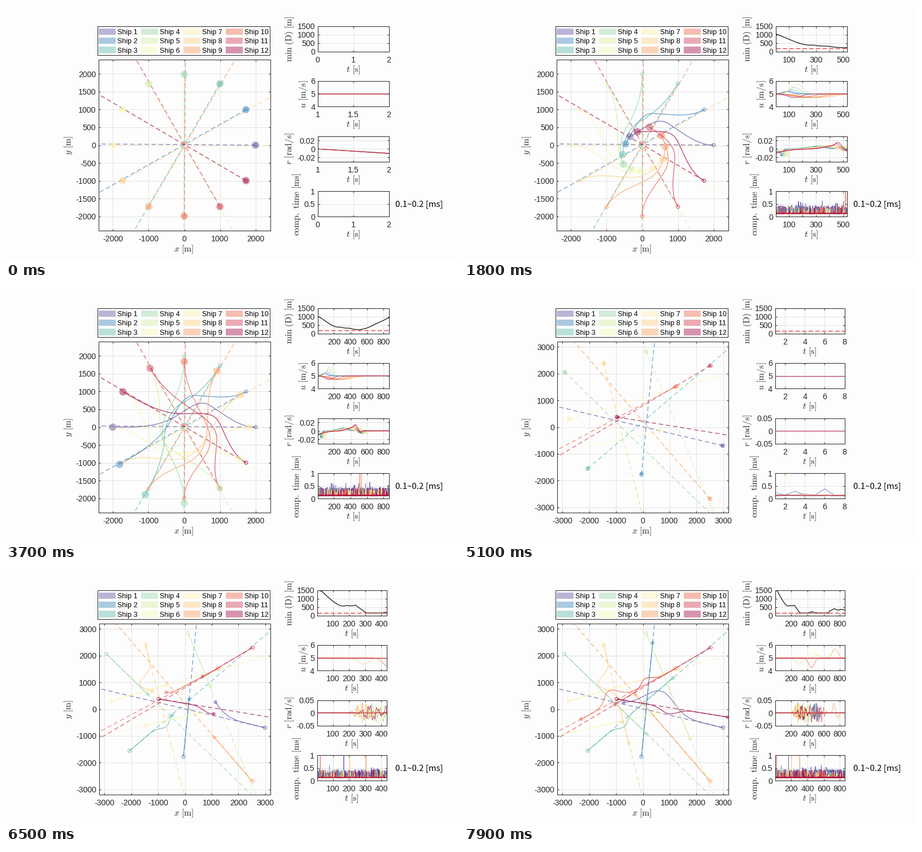
A matplotlib script for the animation above (8 s loop, 800 by 450 pixels).

```python
import numpy as np
import matplotlib.pyplot as plt
from matplotlib.animation import FuncAnimation

W, H, DPI = 800, 450, 100
PX = 72 / DPI
INK, PAPER = "#262626", "#fdfdfe"
COLORS = plt.get_cmap("Spectral_r")(np.linspace(0, 1, 12))
SHIPS = np.arange(12)
PANEL_H = 45.3
SPEED = 5
TIME = np.arange(1, 869)

plt.rcParams.update({
    "font.family": "Liberation Sans", "mathtext.fontset": "cm",
    "axes.unicode_minus": False, "axes.edgecolor": INK,
    "axes.linewidth": PX, "axes.axisbelow": True,
})

fig = plt.figure(figsize=(W / DPI, H / DPI), dpi=DPI, facecolor=PAPER)
stage = fig.add_axes([0, 0, 1, 1], zorder=-1)
stage.set(xlim=(0, W), ylim=(H, 0))
stage.axis("off")


def turn_by(degrees):
    return np.exp(1j * np.radians(degrees))


def bump(center, width, x=TIME):
    return np.exp(-((x - center) / width) ** 2)


def hermite(t, knots, pts, vel):
    knots, pts, vel = map(np.asarray, (knots, pts, vel))
    i = np.clip(np.searchsorted(knots, t, "right") - 1, 0, len(knots) - 2)
    h = knots[i + 1] - knots[i]
    s = np.clip((t - knots[i]) / h, 0, 1)
    return ((1 + 2 * s) * (1 - s) ** 2 * pts[i] + s * (1 - s) ** 2 * h * vel[i]
            + s * s * (3 - 2 * s) * pts[i + 1] + s * s * (s - 1) * h * vel[i + 1])


def nearest_gap(paths, floor):
    """Smallest distance between any two ships at each moment."""
    a, b = np.triu_indices(12, 1)
    return np.maximum(abs(paths[a] - paths[b]).min(axis=0), floor)


def solve_times(seed, peaks):
    rng = np.random.default_rng(seed)
    shape = (12, len(TIME))
    rows = .11 + .035 * rng.random(shape)
    rows += (rng.random(shape) < .03) * .3 * rng.random(shape)
    busy = TIME % 3 == 0
    rows[0, busy] = .28 + .17 * rng.random(busy.sum())
    rows[0] += (rng.random(len(TIME)) < .04) * .2
    for ship, t in peaks:
        rows[ship, t - 1] = 1
    return rows


# ---- circle crossing -------------------------------------------------------
def circle_paths():
    """Each ship veers to starboard, rounds the centre and leaves opposite."""
    r1 = np.interp(SHIPS, [1, 2, 4, 5], [940, 690, 735, 975])
    a1 = np.interp(SHIPS, [1, 2, 3, 4], [41, 33, 33, 39])
    r2 = np.interp(SHIPS, [0, 1, 3, 7, 10, 11], [420, 470, 750, 690, 545, 400])
    a2 = np.interp(SHIPS, [0, 2, 5, 9, 11], [145, 146, 114, 117, 140])
    end = np.interp(SHIPS, [0, 2, 3, 5, 9, 11], [2000, 2180, 2130, 1800, 1840, 1980])
    vel = SPEED * turn_by(np.array([180, 148, 207, 180]))
    return np.array([
        hermite(TIME, [0, 293, 525, 867],
                [2000, r1[i] * turn_by(a1[i]), r2[i] * turn_by(a2[i]), -end[i]], vel)
        * turn_by(30 * i) for i in SHIPS])


def circle_speed():
    rows = []
    for i in SHIPS:
        if i < 5:
            rows.append(SPEED + (.18 + .036 * i * i) * bump(80 + 20 * i, 45 + 4 * i))
        else:
            mid = np.interp(i, [5, 8, 11], [200, 310, 140])
            rows.append(SPEED - .29 * bump(mid, mid * .5))
    return np.array(rows)


def circle_turn():
    rows = []
    for i in SHIPS:
        start = -.011 * np.clip(TIME - 1, 0, 1) * np.exp(-TIME / (20 + 6 * i))
        dip = -.015 * bump(42 + 7 * i, 13) * (i < 8)
        rise = (.005 + .001 * (i % 4)) * bump(290 + 13 * i, 95)
        peak = 435 + 9 * ((i + 4) % 12)
        swing = (.003 + .001 * (i % 6)) * bump(peak, 26) - .006 * bump(peak + 62, 28)
        rows.append(start + dip + rise + swing)
    return np.array(rows)


# ---- random encounter ------------------------------------------------------
# start x, y, heading, then where a dodge peaks, how long and how wide it is
ROUTES = [
    (2996, -696, 166.7, 2570, 800, 800),
    (-53, -1783, 84.4),
    (-2068, -1561, 40.5, 1640, 300, 205),
    (-2932, 2068, -44.2),
    (116, 2848, -67.4),
    (643, -137, -167.6),
    (-2774, 295, 16.3),
    (-1466, 2416, -75.7, 1390, 350, 570),
    (2521, -2700, 130.8),
    (1245, 1530, -151.8, 2610, 420, 440),
    (2532, 2310, -149.2, 2700, 340, 250),
    (-981, 380, -9.3, 2020, 420, 230),
]


def random_path(x, y, heading, at=0, length=1, offset=0):
    """Straight run with one starboard dodge, sailed at constant speed."""
    along = np.arange(0, 5000, 5)
    track = along - 1j * offset * bump(at, length, along)
    arc = np.r_[0, np.cumsum(abs(np.diff(track)))]
    return complex(x, y) + turn_by(heading) * np.interp(SPEED * TIME, arc, track)


def random_speed():
    rows = np.full((12, len(TIME)), float(SPEED))
    for ship, change, mid in [(7, -.5, 290), (9, -.75, 450), (6, .5, 480),
                              (4, .2, 520), (8, .7, 740)]:
        rows[ship] += change * bump(mid, 50)
    return rows


def random_turn():
    rng = np.random.default_rng(5)
    rows = []
    for i in SHIPS:
        wave = np.sin(TIME / (5 + i % 4) + i) + .5 * np.sin(TIME / 2.7 + 2 * i)
        rows.append(.027 * wave * bump(rng.uniform(270, 560), 55))
    rows[8] = rows[8] + .038 * bump(725, 18) - .02 * bump(775, 20)
    return np.clip(rows, -.045, .045)


# ---- drawing ---------------------------------------------------------------
def style(ax):
    ax.grid(color="#dcdcdc", lw=.8 * PX)
    ax.tick_params(direction="in", length=3 * PX, width=PX, color=INK, pad=8 * PX,
                   labelsize=14.1 * PX, labelcolor=INK, top=True, right=True)
    ax.tick_params(axis="y", pad=4.5 * PX)


def box(left, top, right, bottom):
    return fig.add_axes([left / W, 1 - bottom / H, (right - left) / W, (bottom - top) / H],
                        facecolor=PAPER)


def lines(ax, width, alpha):
    return [ax.plot([], [], color=c, lw=width * PX, alpha=alpha)[0] for c in COLORS]


def time_ticks(T, width):
    """Round steps; every second label is dropped when they would touch."""
    step = next(s for s in (1, 2, 5, 10, 20, 50, 100, 200) if T / s < 6)
    ticks = np.arange(step, T + 1, step)
    crowded = step * width / (T - 1) < 8 * len(str(ticks[-1])) + 4.3
    last = len(ticks) - 1
    labels = ["" if crowded and (last - i) % 2 else str(v) for i, v in enumerate(ticks)]
    return ticks, labels


class Scene:
    def __init__(self, plot, limit, ystep, panel, paths, disc, speed, turn,
                 turn_max, turn_tick, solve, safe):
        self.paths, self.gap = paths, nearest_gap(paths, safe)
        self.series = [speed, turn, solve]
        self.panel_width = panel[1] - panel[0]

        main = box(*plot)
        style(main)
        main.set(xlim=(-limit, limit), ylim=(-limit, limit),
                 xticks=np.arange(-(limit // 1000) * 1000, limit, 1000),
                 yticks=np.arange(-(limit // 1000) * 1000, limit, ystep))
        start = paths[:, 0]
        course = paths[:, 1] - start
        goal = start + 9000 * course / abs(course)
        for a, b, c in zip(start, goal, COLORS):
            main.plot([a.real, b.real], [a.imag, b.imag], color=c, lw=1.2 * PX,
                      ls=(0, (6.5, 4)), alpha=.8)
        self.trails = lines(main, 1.2, .8)
        main.scatter(start.real, start.imag, s=(6 * PX) ** 2, facecolors="none",
                     edgecolors=COLORS, linewidths=PX, alpha=.85, zorder=3)
        self.discs = main.scatter(start.real, start.imag, s=(disc * PX) ** 2,
                                  c=COLORS, alpha=.45, linewidths=0, zorder=4)

        tops = 35.5 + 97.5 * np.arange(4)
        self.panels = [box(panel[0], y, panel[1], y + PANEL_H) for y in tops]
        ranges = [(0, 1500, [0, 500, 1000, 1500]), (4, 6, [4, 5, 6]),
                  (-turn_max, turn_max, [-turn_tick, 0, turn_tick]), (0, 1, [0, .5, 1])]
        for ax, (lo, hi, ticks) in zip(self.panels, ranges):
            style(ax)
            ax.set(ylim=(lo, hi), yticks=ticks, yticklabels=[f"{v:g}" for v in ticks])
            ax.text(.5, -32 / PANEL_H, r"$t\ \mathrm{[s]}$", transform=ax.transAxes,
                    ha="center", va="center", size=15.7 * PX, color=INK)
        self.gap_line, = self.panels[0].plot([], [], color="#1c1c1c", lw=1.3 * PX)
        self.safe_line = self.panels[0].axhline(safe, color="#e2382f", lw=1.3 * PX,
                                                ls=(0, (6, 3)))
        self.curves = [lines(ax, .85, .85) for ax in self.panels[1:]]
        self.axes = [main] + self.panels

    def show(self, on):
        for ax in self.axes:
            ax.set_visible(on)

    def draw(self, T):
        t = TIME[:T]
        for line, path in zip(self.trails, self.paths):
            line.set_data(path.real[:T], path.imag[:T])
        now = self.paths[:, T - 1]
        self.discs.set_offsets(np.c_[now.real, now.imag])
        for group, rows in zip(self.curves, self.series):
            for line, row in zip(group, rows):
                line.set_data(t, row[:T])
        self.gap_line.set_data(t, self.gap[:T])

        # the gap and timing panels are still empty at the very start
        begin = T <= 2
        for line in [self.gap_line, self.safe_line] + self.curves[2]:
            line.set_visible(not begin)
        for i, ax in enumerate(self.panels):
            first = 0 if begin and i in (0, 3) else 1
            if begin:
                ticks = [first, (first + 2) / 2, 2]
                labels = [f"{v:g}" for v in ticks]
            else:
                ticks, labels = time_ticks(T, self.panel_width)
            ax.set_xlim(first, T)
            ax.set_xticks(ticks, labels)


def draw_stage():
    stage.add_patch(plt.Rectangle((161.5, 35.5), 305.5, 51, fc=PAPER, ec=INK, lw=PX))
    for i, c in enumerate(COLORS):
        x, y = 164 + 75 * (i // 3), 39.5 + 16.4 * (i % 3)
        stage.add_patch(plt.Rectangle((x, y), 30, 11.4, fc=c, alpha=.42, lw=0))
        stage.text(x + 33, y + 5.9, f"Ship {i + 1}", size=12.5 * PX, color="black",
                   va="center_baseline")
    for x, y, label, angle in [
            (315, 431, r"$x\ \mathrm{[m]}$", 0), (111, 246.5, r"$y\ \mathrm{[m]}$", 90),
            (502.5, 58, r"$\mathrm{min\ (D)\ [m]}$", 90),
            (527, 156, r"$u\ \mathrm{[m/s]}$", 90),
            (502.5, 252.5, r"$r\ \mathrm{[rad/s]}$", 90),
            (515.5, 351, r"$\mathrm{comp.\ time\ [ms]}$", 90)]:
        stage.text(x, y, label, rotation=angle, size=15.7 * PX, color=INK,
                   ha="center", va="center")
    stage.text(689, 352, "0.1~0.2 [ms]", family="Noto Sans CJK JP", size=15 * PX,
               color="black", va="center")


draw_stage()

circle = Scene((163.5, 95, 467.5, 398), 2400, 500, (551.5, 677.5), circle_paths(), 13,
               circle_speed(), circle_turn(), .03, .02,
               solve_times(3, [(5, 3), (9, 515), (8, 535)]), 200)

encounter = Scene((164.8, 95, 468.3, 398), 3200, 1000, (550.5, 673.5),
                  np.array([random_path(*route) for route in ROUTES]), 6.8,
                  random_speed(), random_turn(), .05, .05,
                  solve_times(8, [(5, 2), (9, 21), (0, 167), (7, 205), (8, 305)]), 150)


def draw(k):
    first = k < 51
    circle.show(first)
    encounter.show(not first)
    if first:
        circle.draw(int(min(2 + 29.1 * k, 867)))
    else:
        encounter.draw(int(8 + 30.3 * (k - 51)))
    return []


anim = FuncAnimation(fig, draw, frames=80, interval=100, repeat=True, blit=False)
plt.show()
```
